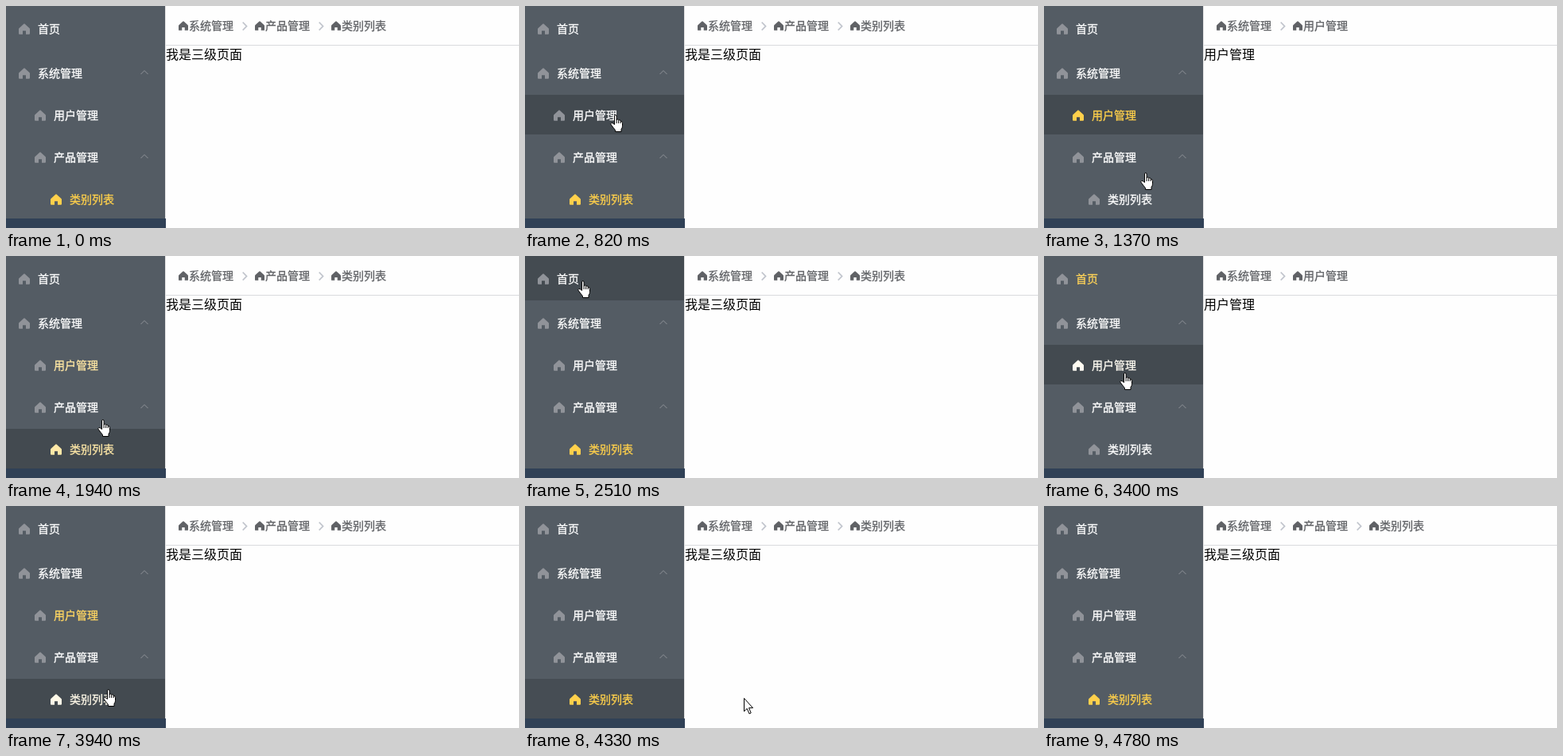
An HTML page that plays this animation: 645 px wide and 280 px high, repeating every 5.52 s.

```html
<!DOCTYPE html>
<html lang="zh-CN">
<head>
<meta charset="utf-8">
<title>导航菜单</title>
<style>
  html, body { margin: 0; width: 100%; height: 100%; overflow: hidden; background: #fefefe; }
  body { position: relative; font: 14px "Noto Sans CJK SC", "Noto Sans CJK", sans-serif; white-space: nowrap; }
  svg { position: absolute; overflow: visible; }
  #side { position: absolute; left: 0; top: 0; width: 201px; height: 280px; background: #304156; }
  #menu { width: 200px; height: 268px; background: #545c64; border-right: 1px solid #e6e6e6; }
  .row { position: absolute; left: 0; width: 200px; color: #fff; }
  .row span, #crumbs span, #page { position: absolute; }
  .row span, #crumbs span { -webkit-text-stroke: .3px; }
  #crumbs { position: absolute; left: 201px; top: 0; right: 0; height: 49px; line-height: 48px;
    color: #606266; border-bottom: 1px solid #d9dbde; }
  #page { left: 201px; top: 50px; font-size: 16px; line-height: 20px; color: #000; }
  .chevron { fill: none; stroke: #909399; }
  .next { fill: none; stroke: #c0c4cc; stroke-width: 1.8; }
  #cursor { left: 0; top: 0; width: 17px; height: 22px; fill: #fff; stroke: #000; stroke-linejoin: round; }
</style>
</head>
<body>
<div id="side"><div id="menu"></div></div>
<div id="crumbs"></div>
<div id="page"></div>
<svg id="cursor"><path/></svg>
<script>
const LOOP = 5520, FADE = 300, REFRESH = 141, HOVER_LAG = 70, SIDE = 200;

const items = [
  { label: '首页', depth: 0 },
  { label: '系统管理', depth: 0, open: true },
  { label: '用户管理', depth: 1 },
  { label: '产品管理', depth: 1, open: true },
  { label: '类别列表', depth: 2, text: '我是三级页面' }
];
let bottom = 0;
for (const item of items) {
  item.y = bottom;
  item.h = item.depth && !item.open ? 50 : 56;
  bottom += item.h;
}

// Places where the mouse rests, and when it clicks there
const stops = [
  { at: 380, until: 390, x: 140, y: 182 },
  { at: 670, until: 1290, x: 107, y: 137, click: 1060 },
  { at: 1365, until: 1370, x: 121, y: 210 },
  { at: 1640, until: 1880, x: 115, y: 237, click: 1846 },
  { at: 1930, until: 1940, x: 115, y: 206 },
  { at: 2360, until: 2640, x: 66, y: 31, click: 2600 },
  { at: 2915, until: 3060, x: 106, y: 149 },
  { at: 3250, until: 3410, x: 95, y: 147, click: 3330 },
  { at: 3670, until: 4190, x: 122, y: 231, click: 3885 },
  { at: 4325, until: 4330, x: 275, y: 242 },
  { at: 4640, until: LOOP, x: 532, y: 280 }
];

const HOUSE = 'M6.2.7Q7 0 7.8.7L13.5 5.9Q14 6.4 14 7V12.8Q14 13.8 13 13.8H9V9.3H5V13.8H1Q0 13.8 0 12.8V7Q0 6.4.5 5.9Z';
const HAND = 'M5.5 12.5V2Q5.5.5 6.8.5T8.1 2V7Q8.4 5.9 9.5 6T10.7 7.5Q11.2 6.6 12.2 6.9T13.2 8.4Q15.5 8 15.5 10.5V14.5Q15.5 16.5 14 18.5V21.5H6.5V19.5Q4 16.5 1.3 12.8Q.3 11.2 1.6 10.6Q3 10 5.5 12.5ZM8.1 7V11M10.7 7.5V11M13.2 8.4V11';
const ARROW = 'M.5.5V17L4.2 13.5L7 20L9.2 19L6.5 12.7H11.5Z';

const $ = id => document.getElementById(id);
const easeOut = p => 1 - (1 - Math.min(p, 1)) ** 2;
const lerp = (a, b, k) => a + (b - a) * k;

function cursorAt(t) {
  const i = stops.findLastIndex(stop => stop.at <= t);
  if (i < 0) return null;
  const a = stops[i], b = stops[i + 1];
  if (t <= a.until || !b) return a;
  const k = easeOut((t - a.until) / (b.at - a.until));
  return { x: lerp(a.x, b.x, k), y: lerp(a.y, b.y, k) };
}

// Menu entry under the fingertip, or -1
const rowAt = p => p && p.x + 6 < SIDE
  ? items.findIndex(({ y, h, open }) => !open && p.y >= y && p.y < y + h) : -1;

// Events are [time, menu entry]
const clicks = [[0, items.length - 1],
  ...stops.filter(stop => stop.click).map(stop => [stop.click, rowAt(stop)])];
const hovers = [[0, -1]];
for (let t = 0; t < LOOP; t += 5) {
  const row = rowAt(cursorAt(t));
  if (row !== hovers.at(-1)[1]) hovers.push([t + HOVER_LAG, row]);
}

// How far an entry has faded towards its chosen state, 0 to 1
function level(events, id, t) {
  let v = events[0][1] === id ? 1 : 0;
  events.forEach(([at, on], i) => {
    if (at > t) return;
    const end = Math.min(t, events[i + 1]?.[0] ?? LOOP);
    v = lerp(v, on === id ? 1 : 0, easeOut((end - at) / FADE));
  });
  return v;
}

const house = (x, y, size) =>
  `<svg class="house" style="left:${x}px;top:${y}px" width="${size}" height="${size}" viewBox="0 0 14 14" fill="currentColor"><path d="${HOUSE}"/></svg>`;
const stroke = (name, x, y, d) =>
  `<svg class="${name}" style="left:${x}px;top:${y}px" width="10" height="11"><path d="${d}"/></svg>`;
const label = (x, text) => `<span style="left:${x}px">${text}</span>`;

$('menu').innerHTML = items.map(({ label: text, y, h, depth, open }) => {
  const x = 16 + 20 * depth, mid = h / 2;
  return `<div class="row" style="top:${y}px;height:${h}px;line-height:${h}px">` +
    house(x, mid - 6, 14) + label(x + 24, text) +
    (open ? stroke('chevron', 169, mid - 3, 'M.5 5L5 .5L9.5 5') : '') + '</div>';
}).join('');
const rows = [...document.querySelectorAll('.row')];
const icons = rows.map(row => row.querySelector('.house'));

function showPage(id) {
  const trail = [items[id]];
  for (let i = id; i >= 0; i--) {
    if (items[i].depth < trail[0].depth) trail.unshift(items[i]);
  }
  $('crumbs').innerHTML = trail.map((item, i) => {
    const x = 16 + 96 * i;
    return (i ? stroke('next', x - 16, 19.5, 'M.7.5L5.5 5.5L.7 10.5') : '') +
      house(x, 19, 12) + label(x + 13, item.label);
  }).join('');
  $('page').textContent = items[id].text || items[id].label;
}

const mix = (a, b, k) => `rgb(${a.map((c, i) => Math.round(lerp(c, b[i], k)))})`;
const WHITE = [255, 255, 255], GOLD = [255, 208, 75], BASE = [84, 92, 100], DARK = [67, 74, 80];

let shownPage, shownTime;
function draw(now) {
  const first = stops[0].at, time = now % LOOP;
  const t = time < first ? 0 : first + Math.floor((time - first) / REFRESH) * REFRESH;
  if (t === shownTime) return;
  shownTime = t;

  const active = clicks.findLast(([at]) => at <= t)[1];
  if (active !== shownPage) showPage(shownPage = active);
  rows.forEach((row, i) => {
    row.style.color = mix(WHITE, GOLD, level(clicks, i, t));
    row.style.background = mix(BASE, DARK, level(hovers, i, t));
    icons[i].style.color = i === active ? 'inherit' : '#909399';
  });

  const cursor = $('cursor'), p = cursorAt(t);
  cursor.style.display = p ? '' : 'none';
  if (p) {
    cursor.style.transform = `translate(${Math.round(p.x)}px,${Math.round(p.y)}px)`;
    cursor.firstChild.setAttribute('d', p.x > SIDE ? ARROW : HAND);
  }
}

const start = performance.now();
function loop() {
  draw(performance.now() - start);
  requestAnimationFrame(loop);
}
loop();
</script>
</body>
</html>
```
